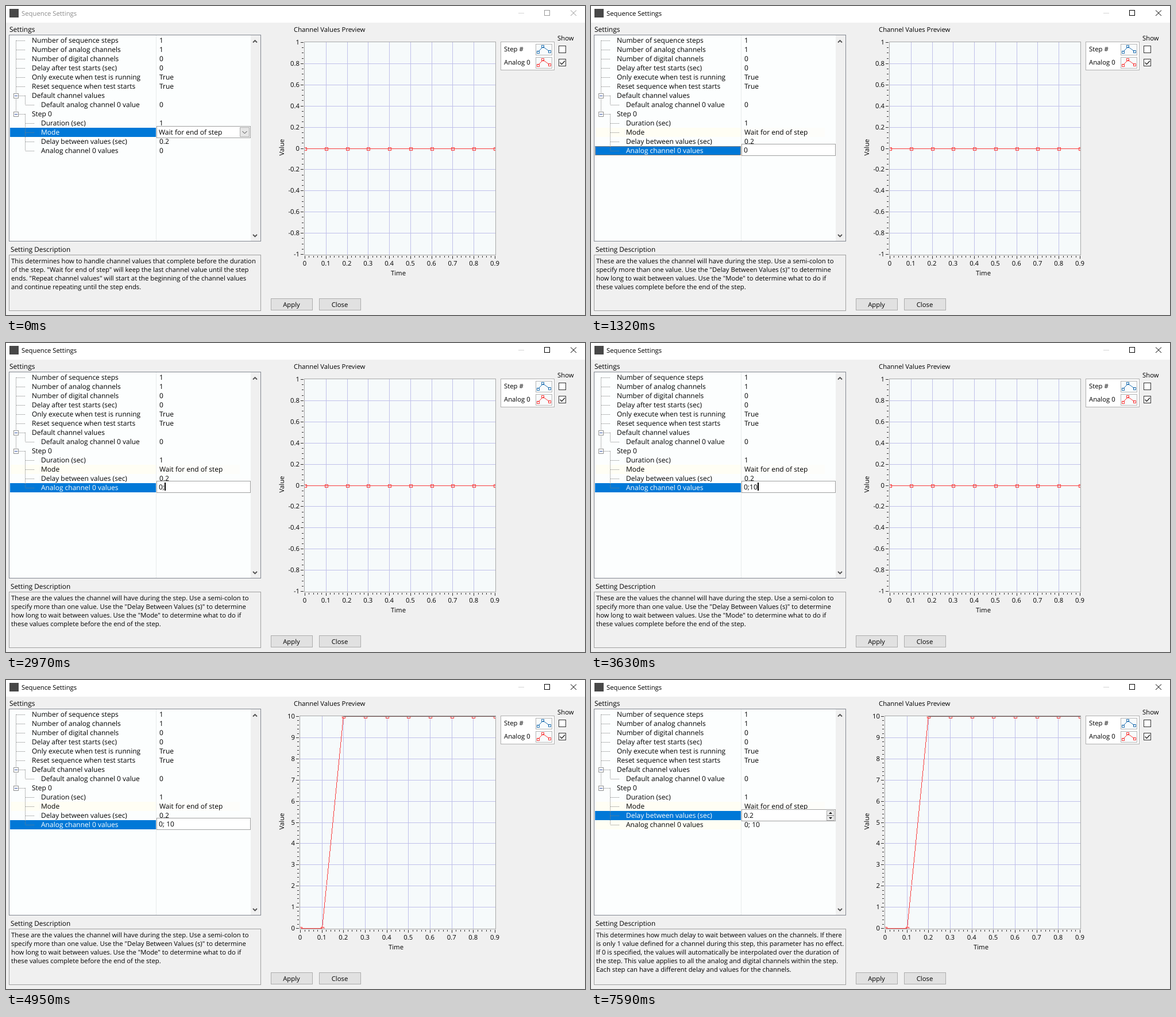
These frames come from a looping animation (1008 px wide and 538 px high, 8000 ms). An HTML page:

```html
<!DOCTYPE html>
<html lang="en">
<head>
<meta charset="utf-8">
<title>Sequence Settings</title>
<style>
html, body { margin: 0; width: 100%; height: 100%; overflow: hidden; background: #f0f0f0; }
svg { display: block; width: 1008px; height: 538px; font-family: "Open Sans", "Noto Sans", sans-serif; text-rendering: geometricPrecision; }
text { white-space: pre; }
.crisp { shape-rendering: crispEdges; }
</style>
</head>
<body>
<svg id="stage" viewBox="0 0 1008 538"></svg>
<script>
const LOOP = 8000;
const BLUE = "#0078d7", RED = "#f83c3c", GRID = "#c0c0ea", GRAY = "#a0a0a0";
const SMALL = 11.3, TREE = 12;

const rows = [
  ["Number of sequence steps", "1"],
  ["Number of analog channels", "1"],
  ["Number of digital channels", "0"],
  ["Delay after test starts (sec)", "0"],
  ["Only execute when test is running", "True"],
  ["Reset sequence when test starts", "True"],
  ["Default channel values", ""],
  ["Default analog channel 0 value", "0", 1],
  ["Step 0", ""],
  ["Duration (sec)", "1", 1],
  ["Mode", "Wait for end of step", 1],
  ["Delay between values (sec)", "0.2", 1],
  ["Analog channel 0 values", "0", 1],
];

const notes = {
  10: ["This determines how to handle channel values that complete before the duration",
    "of the step. \"Wait for end of step\" will keep the last channel value until the step",
    "ends. \"Repeat channel values\" will start at the beginning of the channel values",
    "and continue repeating until the step ends."],
  11: ["This determines how much delay to wait between values on the channels. If there",
    "is only 1 value defined for a channel during this step, this parameter has no effect.",
    "If 0 is specified, the values will automatically be interpolated over the duration of",
    "the step. This value applies to all the analog and digital channels within the step.",
    "Each step can have a different delay and values for the channels."],
  12: ["These are the values the channel will have during the step. Use a semi-colon to",
    "specify more than one value. Use the \"Delay Between Values (s)\" to determine",
    "how long to wait between values. Use the \"Mode\" to determine what to do if",
    "these values complete before the end of the step."],
};

const states = [
  { at: 0, row: 10, text: "Wait for end of step", inactive: true },
  { at: 1320, row: 12, text: "0", focus: true },
  { at: 1980, row: 12, text: "0", caret: 272 },
  { at: 2970, row: 12, text: "0;", caret: 276 },
  { at: 3630, row: 12, text: "0;10", caret: 290 },
  { at: 4620, row: 12, text: "0;10" },
  { at: 4950, row: 12, text: "0; 10", applied: true },
  { at: 7590, row: 11, text: "0.2", applied: true },
];

const box = (x, y, w, h, fill, stroke) => stroke
  ? `<rect class="crisp" x="${x + .5}" y="${y + .5}" width="${w - 1}" height="${h - 1}" fill="${fill}" stroke="${stroke}"/>`
  : `<rect class="crisp" x="${x}" y="${y}" width="${w}" height="${h}" fill="${fill}"/>`;
const path = (d, stroke, extra = "") => `<path d="${d}" fill="none" stroke="${stroke}" ${extra}/>`;
const dots = (d, color = "#808080") => path(d, color, 'class="crisp" stroke-dasharray="1 1"');
const label = (s, x, y, size = SMALL, fill = "#000", extra = "") =>
  `<text x="${x}" y="${y}" font-size="${size}" fill="${fill}" ${extra}>${s}</text>`;
const centered = (s, x, y) => label(s, x, y, SMALL, "#000", 'text-anchor="middle"');

function titleBar({ inactive }) {
  const ink = inactive ? "#999" : "#000";
  return box(0, 0, 1008, 29, "#fff") + box(6, 5, 16, 15, "#484848") +
    label("Sequence Settings", 27, 17, SMALL, inactive ? "#8c8c8c" : "#000") +
    path("M892 12.5H902", "#d4d4d4") + box(937, 7, 10, 10, "none", ink) +
    path("M983 7.5L993 17M993 7.5L983 17", ink);
}

function tree(s) {
  let out = box(5, 50, 439, 360, "#fcfefe", "#828790") + box(426, 51, 17, 358, "#f0f0f0") +
    path("M430 63.5L433.5 60L437 63.5M430 398L433.5 401.5L437 398", "#505050", 'stroke-width="1.8"');
  if (s.row !== 10) out += box(7, 212, 254, 16, "#fffef4") + box(261, 212, 146, 16, "#fdfdfa");
  if (s.row === 11) out += box(7, 244, 254, 16, "#fffef4");
  out += box(261, 51, 1, 358, "#e8ebeb") + box(7, 52 + 16 * s.row, 254, 16, BLUE);
  if (s.focus) out += dots(`M7.5 ${52.5 + 16 * s.row}h253v15h-253z`, "#ff8728");

  out += dots("M17.5 60V188M33.5 156V172M33.5 188V252");
  rows.forEach(([name, value, child], i) => {
    const y = 60 + 16 * i;
    const x = child ? 61 : 45;
    out += dots(`M${child ? 34 : 18} ${y + .5}h16`);
    if (!value) out += box(13, y - 4, 9, 9, "#fff", "#919191") + box(15, y, 5, 1, "#3050a0");
    out += label(name, x, y + 4, TREE, i === s.row ? "#fff" : "#000");
    const shown = i === 12 && s.applied ? "0; 10" : value;
    if (i !== s.row) out += label(shown, 267, y + 4, TREE);
  });
  return out + editor(s);
}

function editor(s) {
  const y = 49 + 16 * s.row - (s.row === 12 ? 1 : 0);
  let out = box(262, y, 164, 21, "#fff", GRAY) + label(s.text, 266, y + 15, TREE);
  if (s.caret) out += box(s.caret, y + 3, 2, 14, "#000");
  if (s.row === 10)
    out += box(407, y + 2, 17, 17, "#e6e6e6", "#adadad") + path(`M411.5 ${y + 9}l4 4l4-4`, "#404040");
  if (s.row === 11)
    for (const [dy, tip] of [[2, -3], [11, 3]]) {
      const mid = y + dy + 4.5;
      out += box(410, y + dy, 14, 9, "#ececec", "#adadad") +
        `<path d="M414 ${mid - tip / 2}h6l-3 ${tip}z" fill="#000"/>`;
    }
  return out;
}

function description({ row }) {
  return label("Setting Description", 8, 428, 11.8) + box(5, 433, 439, 98, "#f0f0f0", GRAY) +
    notes[row].map((line, i) => label(line, 9, 448 + Math.round(15.1 * i))).join("");
}

function chart({ applied }) {
  const left = applied ? 512 : 520, right = 852, top = 63, bottom = 433;
  const dx = (right - left - 1) / 9, dy = (bottom - top - 1) / 10;
  const px = i => Math.round(left + dx * i) + .5;
  const py = i => Math.round(top + dy * i) + .5;
  let grid = "", ticks = "", out = box(left - 1, top - 1, right - left + 2, bottom - top + 2, "#f6fafb", "#a8a8a8");

  for (let i = 0; i < 10; i++) {
    if (i % 9) grid += `M${px(i)} ${top}V${bottom}`;
    ticks += `M${px(i)} 435v5`;
    for (let k = 1; k < 5 && i < 9; k++) ticks += `M${px(i + k / 5)} 435v3`;
    out += centered(i ? (i / 10).toFixed(1) : "0", left + dx * i, 452);
  }
  const parts = applied ? 5 : 4;
  for (let i = 0; i <= 10; i++) {
    if (i % 10) grid += `M${left} ${py(i)}H${right}`;
    ticks += `M${left - 2} ${py(i)}h-5`;
    for (let k = 1; k < parts && i < 10; k++) ticks += `M${left - 2} ${py(i + k / parts)}h-3`;
    const value = applied ? 10 - i : +(1 - i / 5).toFixed(1);
    out += label(value, left - 9, py(i) + 3.5, SMALL, "#000", 'text-anchor="end"');
  }
  out += path(grid, GRID, 'class="crisp"') + path(ticks, "#303030", 'class="crisp"');

  const points = Array.from({ length: 10 }, (_, i) => [px(i), applied ? py(i < 2 ? 10 : 0) : py(5)]);
  const marks = points.map(([x, y]) => `M${x - 2} ${y - 2}h5v5h-5z`).join("");
  out += `<clipPath id="plot"><rect x="${left}" y="${top}" width="${right - left}" height="${bottom - top}"/></clipPath>` +
    `<g clip-path="url(#plot)">${path("M" + points.join("L") + marks, RED, 'class="crisp"')}</g>`;
  if (applied) out += box(587, 63, 265, 1, "#705050");

  return label("Channel Values Preview", 501, 45) + out +
    centered("Time", (left + right) / 2 - 3, 469) +
    `<g transform="translate(484 246) rotate(-90)">${centered("Value", 0, 0)}</g>`;
}

function legend() {
  const entry = (name, y, color) => label(name, 867, y + 4) +
    box(922, y - 9, 29, 20, "#f8fbfc", "#b4b4b4") +
    path(`M926 ${y + 5}L935 ${y - 4}L946 ${y + 4}`, color) +
    path(`M924.5 ${y + 3.5}h4v4h-4zM932.5 ${y - 6.5}h4v4h-4zM944.5 ${y + 2.5}h4v4h-4z`, color, 'class="crisp"') +
    box(962, y - 6, 13, 13, "#fff", "#333");
  return box(861, 62, 94, 50, "#fff", "#b0b0b0") + label("Show", 960, 60) +
    entry("Step #", 75, "#2874b2") + entry("Analog 0", 98, RED) +
    path("M964.5 98.5l3 3l5.5-6", "#222", 'stroke-width="1.3"');
}

const button = (name, x) => box(x, 509, 73, 21, "#e1e1e1", "#adadad") + centered(name, x + 36, 524);

const render = s => titleBar(s) + label("Settings", 6, 45, 12) + tree(s) + description(s) +
  chart(s) + legend() + button("Apply", 461) + button("Close", 545);

const stage = document.getElementById("stage");
const start = performance.now();
let current;

function tick() {
  const t = (performance.now() - start) % LOOP;
  const state = states.findLast(s => s.at <= t) || states[0];
  if (state !== current) stage.innerHTML = render(current = state);
  requestAnimationFrame(tick);
}
tick();
</script>
</body>
</html>
```
